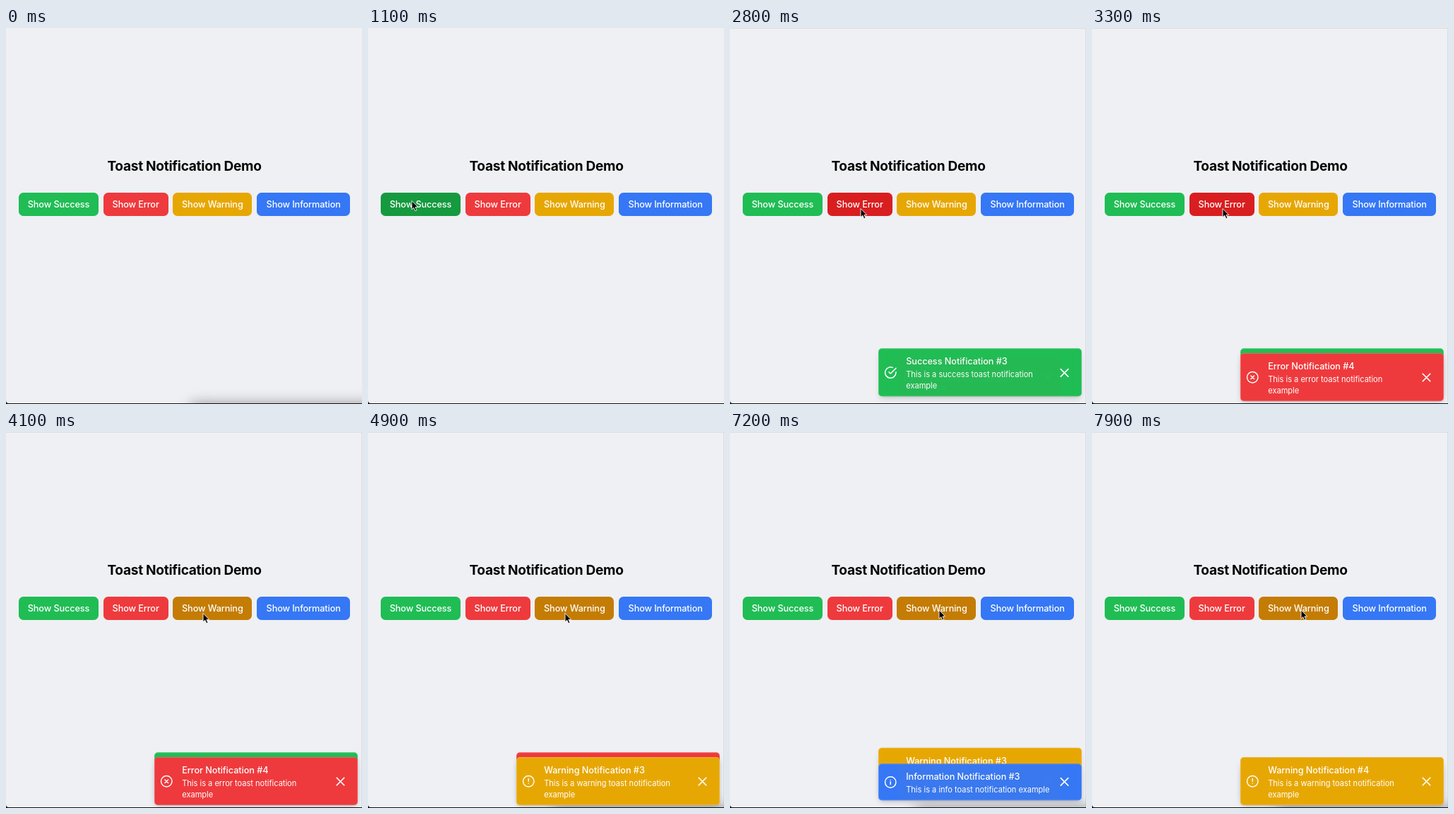
These frames come from a looping animation (504 by 532 pixels, 8000 ms). An HTML page:

```html
<!DOCTYPE html>
<html lang="en">
<head>
<meta charset="utf-8">
<title>Toast Notification Demo</title>
<style>
  html, body { margin: 0; width: 100%; height: 100%; overflow: hidden; }
  body { background: #111; font-family: Inter, sans-serif; }
  #stage {
    position: relative; width: 504px; height: 531px; overflow: hidden;
    background: #eff0f4; border-bottom-left-radius: 4px;
  }
  #stage > * { position: absolute; box-sizing: border-box; }
  h1 {
    left: 0; top: 182.6px; width: 505px; margin: 0; text-align: center;
    font-size: 19.1px; font-weight: 650; line-height: 24px; letter-spacing: -.29px; color: #050506;
  }
  .button {
    top: 233px; height: 32.5px; border-radius: 6.6px; color: #fff; text-align: center;
    font-size: 12.7px; font-weight: 500; line-height: 33px; letter-spacing: -.1px; white-space: nowrap;
  }
  .toast {
    left: 210px; bottom: 2.8px; width: 288px; padding: 8.8px 39.2px 6.8px; border-radius: 5px; color: #fff;
    box-shadow: inset 0 0 0 1px rgba(255,255,255,.18), 0 5px 10px -2px rgba(0,0,0,.14), 0 2px 4px -2px rgba(0,0,0,.1);
    white-space: nowrap;
  }
  .toast b { display: block; font-size: 12.7px; font-weight: 500; line-height: 19.75px; letter-spacing: -.05px; }
  .toast span { display: block; font-size: 11.1px; line-height: 16.46px; letter-spacing: -.02px; }
  .toast svg {
    position: absolute; top: 50%; width: 18.5px; height: 18.5px; margin-top: -9.2px;
    fill: none; stroke: #fff; stroke-width: 1.9; stroke-linecap: round; stroke-linejoin: round;
  }
  .toast .icon { left: 8.2px; }
  .toast .close { left: 253.2px; width: 21px; height: 21px; margin-top: -10.5px; }
  #parked { left: 264px; top: 534px; width: 270px; height: 60px; box-shadow: 0 0 18px 2px rgba(0,0,0,.42); }
  #edge { inset: 0; border: solid #dcdde1; border-width: 1px 1px 0 0; }
  #cursor { left: 0; top: 0; width: 12.6px; height: 18px; overflow: visible; }
</style>
</head>
<body>
<div id="stage">
  <div id="edge"></div>
  <h1>Toast Notification Demo</h1>
  <div id="parked"></div>
  <svg id="cursor" viewBox="0 0 14 20">
    <path d="M0 0V13.6L3.1 10.8L5.3 15.8L7.7 14.8L5.5 9.9H9.7Z" fill="#000" stroke="#fff" stroke-width="1"/>
  </svg>
</div>
<script>
const LOOP = 8000, STACK_STEP = 6.7, ENTER = 250, EXIT = 300, LINGER = 1300;
const stage = document.getElementById('stage');
const cursor = document.getElementById('cursor');
const edge = document.getElementById('edge');
const parked = document.getElementById('parked');

const ring = '<circle cx="12" cy="12" r="10"/>';
const kinds = {
  success: { label: 'Success', x: 18, width: 113, color: [32, 189, 85], hover: [21, 154, 63],
    icon: '<path d="M22 11.1V12a10 10 0 1 1-5.9-9.1M22 4L12 14l-3-3"/>' },
  error: { label: 'Error', x: 137.5, width: 92.3, color: [238, 58, 61], hover: [217, 30, 32],
    icon: ring + '<path d="M15 9l-6 6M9 9l6 6"/>' },
  warning: { label: 'Warning', x: 236.2, width: 112.3, color: [231, 167, 3], hover: [196, 124, 4],
    icon: ring + '<path d="M12 7v5M12 16v.01"/>' },
  info: { label: 'Information', x: 355, width: 132.3, color: [53, 119, 245], hover: [34, 87, 232],
    icon: ring + '<path d="M12 16v-5M12 8v.01"/>' }
};

const toasts = [
  { kind: 'success', number: 2, start: -3000, end: -1200 },
  { kind: 'success', number: 3, start: 1510, end: 4400 },
  { kind: 'error', number: 4, start: 2795, end: 5985 },
  { kind: 'warning', number: 3, start: 4400, end: 7190 },
  { kind: 'info', number: 3, start: 5985, end: Infinity },
  { kind: 'warning', number: 4, start: 7195, end: Infinity }
];

// Cursor stops: arrival time, departure time, x, y
const stops = [
  [100, 250, 472, 352],
  [1050, 2050, 62, 244.5],
  [2600, 3650, 185, 255.5],
  [4050, 5450, 279, 256.5],
  [5900, 6450, 408, 251.5],
  [7000, LOOP, 296, 252]
];

const clamp = v => Math.min(1, Math.max(0, v));
const smooth = p => p * p * (3 - 2 * p);
const mix = (a, b, p) => a + (b - a) * p;
const rgb = (a, b = a, p = 0) => `rgb(${a.map((v, i) => Math.round(mix(v, b[i], p)))})`;
const show = (node, visible) => { node.style.display = visible ? '' : 'none'; };

function addBox(className, html, before) {
  const node = document.createElement('div');
  node.className = className;
  node.innerHTML = html;
  stage.insertBefore(node, before);
  return node;
}

for (const kind of Object.values(kinds)) {
  kind.node = addBox('button', 'Show ' + kind.label, parked);
  kind.node.style.left = kind.x + 'px';
  kind.node.style.width = kind.width + 'px';
}

for (const toast of toasts) {
  const { label, icon, color } = kinds[toast.kind];
  const lineBreak = toast.kind === 'info' ? ' ' : '<br>';
  toast.node = addBox('toast', `
    <svg class="icon" viewBox="0 0 24 24">${icon}</svg>
    <b>${label} Notification #${toast.number}</b>
    <span>This is a ${toast.kind} toast notification${lineBreak}example</span>
    <svg class="close" viewBox="0 0 24 24"><path d="M6 6l12 12M18 6L6 18"/></svg>`, cursor);
  toast.node.style.background = rgb(color);
}

function cursorAt(t) {
  const next = stops.findIndex(([arrival]) => t < arrival);
  if (next === 0) return [-100, -100];
  const [, departure, x, y] = stops.at(next < 0 ? -1 : next - 1);
  if (next < 0 || t <= departure) return [x, y];
  const [arrival, , toX, toY] = stops[next];
  const p = smooth((t - departure) / (arrival - departure));
  return [mix(x, toX, p), mix(y, toY, p)];
}

// Share of the last 150 ms that the cursor spent over the button
function hoverAmount(kind, t) {
  let hits = 0;
  for (let i = 0; i < 10; i++) {
    const [x, y] = cursorAt(t - i * 15);
    if (x >= kind.x && x <= kind.x + kind.width && y >= 233 && y <= 266) hits++;
  }
  return hits / 10;
}

function drawToast(toast, t) {
  const visible = t >= toast.start && t < toast.end + EXIT;
  show(toast.node, visible);
  if (!visible) return;
  const newer = toasts.filter(other => other.start > toast.start && other.start <= t).length;
  const entered = clamp((t - toast.start) / ENTER);
  const exited = clamp((t - toast.end) / EXIT);
  const y = exited ** 2 * 100 - newer * STACK_STEP;
  toast.node.style.opacity = entered;
  toast.node.style.transform = `translateY(${y}px) scale(${mix(.8, 1, smooth(entered))})`;
}

function render(t) {
  const [x, y] = cursorAt(t);
  cursor.style.transform = `translate(${x}px, ${y}px)`;
  // A dismissed toast waits just below the stage, so only its shadow shows
  show(parked, toasts.some(({ end }) => t >= end + EXIT && t < end + LINGER));
  show(edge, t >= 1200);
  for (const kind of Object.values(kinds)) {
    kind.node.style.background = rgb(kind.color, kind.hover, hoverAmount(kind, t));
  }
  for (const toast of toasts) drawToast(toast, t);
}

const began = performance.now();
function tick() {
  render((performance.now() - began) % LOOP);
  requestAnimationFrame(tick);
}
tick();
</script>
</body>
</html>
```
